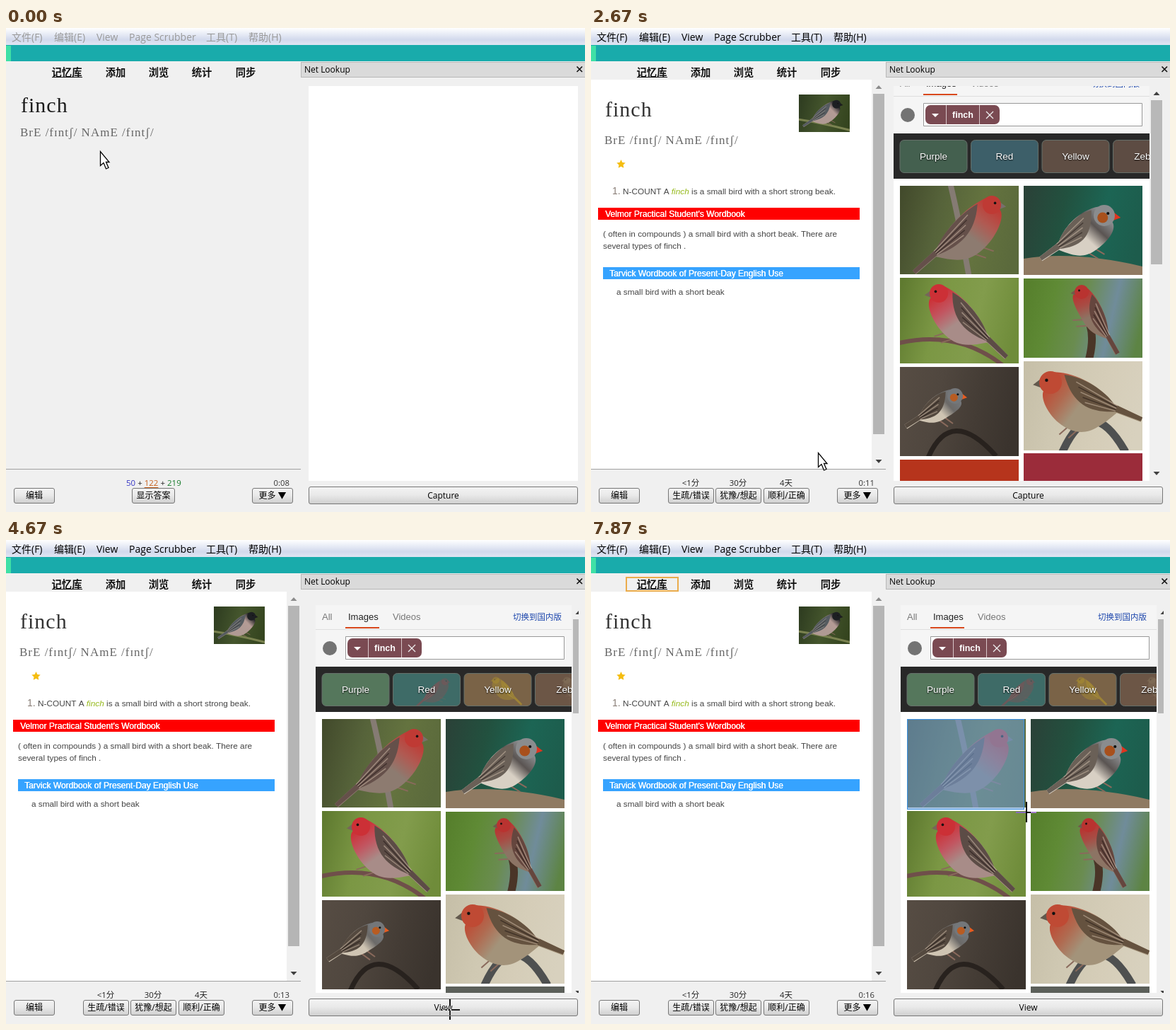
These frames come from a looping animation (819 by 684 pixels, 8 s). An HTML page with a canvas:

```html
<!DOCTYPE html>
<html lang="zh">
<head>
<meta charset="utf-8">
<title>Flashcard image capture</title>
<style>
html, body { margin: 0; width: 100%; height: 100%; overflow: hidden; background: #f0f0f0; }
canvas { display: block; }
</style>
</head>
<body>
<canvas id="stage" width="819" height="684"></canvas>
<script>
const ctx = document.getElementById('stage').getContext('2d');
const LOOP = 8000;
const ANSWER = 1400, PAGE = 2070, SETTLED = 2870, CAPTURE = 4330, DRAG = 6670;

const ui = (size, weight = '') => `${weight} ${size}px "Open Sans", "Noto Sans CJK SC", sans-serif`;
const sans = (size, style = '') => `${style} ${size}px "Liberation Sans", "Noto Sans CJK SC", sans-serif`;
const serif = size => `${size}px "Liberation Serif", serif`;

// Drawing helpers
function rect(x, y, w, h, color) {
  ctx.fillStyle = color;
  ctx.fillRect(x, y, w, h);
}
function text(str, x, y, font, color = '#000', align = 'left') {
  ctx.font = font;
  ctx.fillStyle = color;
  ctx.textAlign = align;
  ctx.fillText(str, x, y);
  return ctx.measureText(str).width;
}
function spaced(str, x, y, font, color) {
  ctx.letterSpacing = '1px';
  text(str, x, y, font, color);
  ctx.letterSpacing = '0px';
}
function line(color, width, ...p) {
  ctx.strokeStyle = color;
  ctx.lineWidth = width;
  ctx.beginPath();
  for (let i = 0; i < p.length; i += 2) ctx.lineTo(p[i], p[i + 1]);
  ctx.stroke();
}
function polygon(fill, ...p) {
  ctx.fillStyle = fill;
  ctx.beginPath();
  for (let i = 0; i < p.length; i += 2) ctx.lineTo(p[i], p[i + 1]);
  ctx.closePath();
  ctx.fill();
}
function circle(x, y, r, fill) {
  ctx.fillStyle = fill;
  ctx.beginPath();
  ctx.arc(x, y, r, 0, 7);
  ctx.fill();
}
function rounded(x, y, w, h, r, fill, stroke) {
  ctx.beginPath();
  ctx.roundRect(x, y, w, h, r);
  ctx.fillStyle = fill;
  ctx.fill();
  if (stroke) {
    ctx.strokeStyle = stroke;
    ctx.lineWidth = 1;
    ctx.stroke();
  }
}
function gradient(x0, y0, x1, y1, ...colors) {
  const g = ctx.createLinearGradient(x0, y0, x1, y1);
  colors.forEach((c, i) => g.addColorStop(i / (colors.length - 1), c));
  return g;
}
function clipped(x, y, w, h, draw) {
  ctx.save();
  ctx.beginPath();
  ctx.rect(x, y, w, h);
  ctx.clip();
  draw();
  ctx.restore();
}
const ramp = (t, from, to) => Math.min(1, Math.max(0, (t - from) / (to - from)));

// Pictures: branch = start, control, end, width, colour; colors = head, wing, breast, belly, beak
const photos = {
  vertical: { bg: ['#434b2c', '#56633a', '#64733f', '#5b6a3c'], branch: [71, -4, 84, 50, 98, 130, 8, '#857b73'],
    head: [130, 27], tail: [20, 122], r: 13, fat: .27, colors: ['#bf3a34', '#65504a', '#b05a52', '#8d7b70', '#77706c'] },
  rock: { bg: ['#2a4238', '#22513f', '#1c6554', '#1d5c4c'], branch: [-5, 118, 70, 104, 175, 130, 28, '#8f7a62'],
    head: [114, 42], tail: [24, 103], r: 15, fat: .31, colors: ['#8a8c8e', '#6a6057', '#5a5452', '#d8d0c4', '#e0341e'], cheek: '#a8501c' },
  perched: { bg: ['#5f7a30', '#7b9744', '#829c4c', '#6f8c3a'], branch: [-5, 93, 80, 72, 146, 124, 6, '#6f4f4a'],
    head: [55, 22], tail: [151, 112], r: 13, fat: .28, colors: ['#cc3036', '#5c4c46', '#c25560', '#a88c88', '#77655a'] },
  stump: { bg: ['#567f2c', '#5f8a35', '#6a8c50', '#708c9a', '#5d8444'], branch: [94, 66, 100, 86, 92, 116, 11, '#4a3527'],
    head: [82, 19], tail: [133, 106], r: 10, fat: .19, colors: ['#b93330', '#65463e', '#a84c44', '#8c7464', '#71594b'] },
  grey: { bg: ['#564c43', '#50473f', '#443c35', '#3a332d'], branch: [40, 128, 72, 54, 136, 126, 7, '#28221e'],
    head: [78, 41], tail: [8, 84], r: 11, fat: .24, colors: ['#74777a', '#54493f', '#6c6a68', '#cfc4b2', '#e85c20'], cheek: '#b85c22' },
  pale: { bg: ['#c6bfa8', '#cfc8b2', '#d5cdb8', '#d8d1be'], branch: [54, 130, 94, 40, 144, 128, 11, '#4e5050'],
    head: [38, 30], tail: [167, 82], r: 16, fat: .37, colors: ['#bf4a34', '#65523f', '#b06a50', '#a3937a', '#62594d'] },
  card: { bg: ['#2e3c20', '#45562d', '#35451f'], branch: [0, 82, 70, 92, 170, 118, 7, '#7a8250'],
    head: [124, 32], tail: [14, 104], r: 14, fat: .28, colors: ['#1d1f22', '#555b60', '#b49b95', '#b09a94', '#1b1c1d'] },
};

function bird({ head: [hx, hy], tail: [tx, ty], r, fat, colors: [head, wing, breast, bellyColor, beak], cheek }) {
  const side = Math.sign(tx - hx), len = Math.hypot(tx - hx, ty - hy), belly = len * fat;
  ctx.save();
  ctx.translate(hx, hy);
  ctx.rotate(Math.atan2(ty - hy, tx - hx));
  ctx.scale(1, side);
  for (const at of [.36, .46]) line('#8a6a5c', 2, len * at, belly * .8, len * (at - .08), belly + 12);

  ctx.beginPath();
  ctx.moveTo(0, -r);
  ctx.bezierCurveTo(len * .22, -r * 1.7, len * .5, -r * 1.3, len * .68, -r * .35);
  ctx.lineTo(len, -3);
  ctx.lineTo(len, 4);
  ctx.lineTo(len * .74, r * .3);
  ctx.bezierCurveTo(len * .62, belly * .7, len * .54, belly, len * .36, belly);
  ctx.bezierCurveTo(len * .16, belly, -len * .04, r * 1.8, -r * .3, r * .9);
  ctx.fillStyle = gradient(0, 0, len * .55, belly * .4, head, breast, bellyColor, bellyColor);
  ctx.fill();

  ctx.beginPath();
  ctx.moveTo(len * .1, -r * 1.1);
  ctx.bezierCurveTo(len * .3, -r * 1.6, len * .55, -r * 1.1, len * .68, -r * .35);
  ctx.lineTo(len, -3);
  ctx.lineTo(len, 3);
  ctx.lineTo(len * .72, r * .25);
  ctx.bezierCurveTo(len * .5, r * 1.1, len * .3, r * 1.2, len * .1, -r * 1.1);
  ctx.fillStyle = wing;
  ctx.fill();
  for (let i = 0; i < 5; i++) {
    const x = len * (.24 + i * .04), y = r * (i * .35 - .9);
    line(i % 2 ? 'rgba(30,20,18,.5)' : 'rgba(215,195,175,.5)', 1.5, x, y, len * .72, r * (i * .12 - .3));
  }
  ctx.restore();
  polygon(beak, hx - side * r * .7, hy - r * .45, hx - side * r * 1.55, hy + r * .2, hx - side * r * .6, hy + r * .55);
  circle(hx, hy, r, head);
  if (cheek) circle(hx + side * r * .15, hy + r * .2, r * .5, cheek);
  circle(hx - side * r * .35, hy - r * .2, r * .14, '#111');
}
function photo(x, y, w, h, name, scale = 1) {
  const spec = photos[name], [x0, y0, cx, cy, x1, y1, width, color] = spec.branch;
  clipped(x, y, w, h, () => {
    ctx.translate(x, y);
    ctx.scale(scale, scale);
    rect(0, 0, 170, 130, gradient(0, 20, 168, 60, ...spec.bg));
    ctx.strokeStyle = color;
    ctx.lineWidth = width;
    ctx.beginPath();
    ctx.moveTo(x0, y0);
    ctx.quadraticCurveTo(cx, cy, x1, y1);
    ctx.stroke();
    bird(spec);
  });
}

// Interface parts
function button(label, x, y, w, h, hover = 0, focus = false) {
  rounded(x + .5, y + .5, w, h, 2.5, gradient(0, y, 0, y + h, '#f4f4f4', '#e9e9e9', '#d0d0d0'), '#777');
  if (hover) {
    ctx.globalAlpha = hover;
    rounded(x + .5, y + .5, w, h, 2.5, gradient(0, y, 0, y + h, '#e6f3fb', '#c4e3f5', '#a2cee6'), '#3c7fb1');
    ctx.globalAlpha = 1;
  }
  if (focus) {
    ctx.strokeStyle = '#dc9a3c';
    ctx.lineWidth = 2;
    ctx.strokeRect(x + 1, y + 1, w - 1, h - 1);
  }
  text(label, x + w / 2 + .5, y + h / 2 + 4.5, ui(12), '#000', 'center');
}
function scrollbar(x, top, bottom, thumbHeight, upColor, thumb) {
  rect(x - 10, top, 20, bottom - top, '#f0f0f0');
  rect(x - 8, top + 20, 16, thumbHeight, thumb);
  polygon(upColor, x - 4.5, top + 13, x + 4.5, top + 13, x, top + 8);
  polygon('#404040', x - 4.5, bottom - 13, x + 4.5, bottom - 13, x, bottom - 8);
}

function drawMenu(t) {
  rect(0, 0, 819, 25, gradient(0, 0, 0, 25, '#fff', '#e8ecf6', '#d2d9ec', '#e2e7f4'));
  const color = t < ANSWER ? '#999' : '#000';
  [['文件(F)', 8], ['编辑(E)', 68], ['View', 128], ['Page Scrubber', 174], ['工具(T)', 283], ['帮助(H)', 343]]
    .forEach(([label, x]) => text(label, x, 18, ui(14), color));
  rect(0, 24, 819, 23, '#19abab');
  rect(0, 25, 7, 22, '#3fe0a6');
}
function drawToolbar(t) {
  [['记忆库', 86], ['添加', 155], ['浏览', 216], ['统计', 277], ['同步', 339]]
    .forEach(([label, x]) => text(label, x, 68, ui(14.3, 'bold'), '#111', 'center'));
  rect(65, 69, 43, 1, '#111');
  if (t >= 4800) {
    ctx.strokeStyle = '#eaac4c';
    ctx.lineWidth = 2;
    ctx.strokeRect(50, 53, 73, 19);
  }
}
function drawQuestion() {
  spaced('finch', 21, 119, serif(30), '#1c1c1c');
  spaced('BrE /fɪntʃ/ NAmE /fɪntʃ/', 20, 153, serif(17), '#666');
}
function heading(str, x, y, left, color) {
  rect(left, y, 380 - left, 17, color);
  for (const dx of [0, .4]) text(str, x + dx, y + 12.5, sans(12), '#fff');
}
function drawAnswer() {
  rect(0, 73, 397, 550, '#fff');
  scrollbar(407, 73, 623, 481, '#8c8c8c', '#b5b5b5');
  spaced('finch', 20, 125, serif(30), '#333');
  spaced('BrE /fɪntʃ/ NAmE /fɪntʃ/', 19, 164, serif(17), '#666');
  photo(294, 94, 72, 53, 'card', 72 / 168);
  const star = [];
  for (let i = 0; i < 10; i++) {
    const a = i * Math.PI / 5 - Math.PI / 2, r = i % 2 ? 3.2 : 6.5;
    star.push(42.5 + r * Math.cos(a), 192.5 + r * Math.sin(a));
  }
  polygon('#f5bd10', ...star);
  const body = sans(11.8), ink = '#444';
  text('1.', 30, 235, sans(14), '#8a7f78');
  let x = 45;
  x += text('N-COUNT A ', x, 235, body, ink);
  x += text('finch', x, 235, sans(11.8, 'italic'), '#94b818');
  text(' is a small bird with a short strong beak.', x, 235, body, ink);
  heading("Velmor Practical Student's Wordbook", 20, 254, 10, '#f00');
  text('( often in compounds ) a small bird with a short beak. There are', 17, 295, body, ink);
  text('several types of finch .', 17, 312, body, ink);
  heading('Tarvick Wordbook of Present-Day English Use', 26, 338, 17, '#36a3ff');
  text('a small bird with a short beak', 36, 377, body, ink);
}
function drawBottom(t) {
  rect(0, 623, 417, 1, '#a0a0a0');
  button('编辑', 11, 650, 57, 21);
  button('更多 ▼', 348, 650, 57, 21);
  const seconds = 8 + Math.floor((t + 600) / 1000);
  text('0:' + String(seconds).padStart(2, '0'), 401, 647, ui(11.3), '#333', 'right');
  if (t < ANSWER) {
    let x = 170;
    [['50', '#3434c4'], [' + ', '#222'], ['122', '#c8601c'], [' + ', '#222'], ['219', '#147a28']].forEach(([s, color]) => {
      const w = text(s, x, 647, ui(11.5), color);
      if (s === '122') rect(x, 649, w, 1, color);
      x += w;
    });
    button('显示答案', 178, 650, 60, 21, 0, t >= 1070);
  } else {
    [['<1分', '生疏/错误', 109], ['30分', '犹豫/想起', 176], ['4天', '顺利/正确', 244]].forEach(([wait, label, x], i) => {
      text(wait, x + 32, 647, ui(11.5), '#222', 'center');
      button(label, x, 650, 64, 21, 0, i === 1 && t < 2600);
    });
  }
}

// Search page in its own coordinates, 362 wide
function drawPage(t) {
  const loaded = t >= SETTLED;
  rect(0, 0, 362, 600, '#fff');
  rect(0, 0, 362, 87, '#f5f5f5');
  text('All', 9, 21, sans(13), '#777');
  text('Images', 46, 21, sans(13), '#222');
  text('Videos', 109, 21, sans(13), '#777');
  text('切换到国内版', 348, 21, sans(11.5), '#1c46ac', 'right');
  rect(0, 34, 362, 1, '#dedede');
  rect(42, 31, 48, 2, '#d8481c');
  circle(20, 61, 10, '#737373');
  rounded(42.5, 44.5, 309, 32, 0, '#fff', '#999');
  rounded(45, 47, 105, 27, 7, '#7a4a52');
  rect(74, 47, 1, 27, '#d8c6c9');
  rect(121, 47, 1, 27, '#d8c6c9');
  polygon('#fff', 54, 59, 64, 59, 59, 64);
  text('finch', 98, 65, sans(12.5, 'bold'), '#fff', 'center');
  line('#eee', 1.3, 131, 56, 141, 66);
  line('#eee', 1.3, 141, 56, 131, 66);

  rect(0, 87, 362, 64, '#282828');
  const chips = [['Purple', '#44604f', '#55775c'], ['Red', '#3d5f69', '#3e6b67'], ['Yellow', '#5f4e44', '#7a6347'], ['Zebra', '#5d4c43', '#6c5646']];
  const tints = [null, '#8c4c50', '#b89a28', '#8a7860'];
  chips.forEach(([label, plain, rich], i) => {
    const x = 9 + i * 100.5;
    rounded(x, 96.5, 95, 46, 6, loaded ? rich : plain, '#66706a');
    if (loaded && tints[i]) clipped(x, 97, 95, 45, () => {
      ctx.globalAlpha = .35;
      ctx.translate(x + 24, 98);
      ctx.scale(.38, .38);
      bird({ ...photos[i === 1 ? 'vertical' : 'perched'], colors: Array(5).fill(tints[i]) });
    });
    ctx.shadowColor = '#000';
    ctx.shadowOffsetY = 1;
    ctx.shadowBlur = 2;
    text(label, x + 47.5, 124, sans(13.5), '#fff', 'center');
    ctx.shadowColor = 'transparent';
    ctx.shadowOffsetY = ctx.shadowBlur = 0;
  });

  photo(9, 161, 168, 125, 'vertical');
  photo(184, 161, 168, 126, 'rock');
  photo(9, 291, 168, 121, 'perched');
  photo(184, 292, 168, 112, 'stump');
  photo(9, 417, 168, 126, 'grey');
  photo(184, 409, 168, 126, 'pale');
  const captured = t >= CAPTURE;
  rect(9, 548, 168, 50, captured ? '#cfc0b4' : '#b6341c');
  rect(184, 539, 168, 50, captured ? '#5c605a' : '#9b2c3a');
}
function drawDock(t) {
  rect(417, 47, 402, 637, '#f0f0f0');
  rect(417, 48, 402, 22, '#b8b8b8');
  rect(418, 49, 401, 20, '#dadada');
  text('Net Lookup', 422, 63, ui(12));
  line('#111', 1.6, 807.5, 54.5, 815, 62);
  line('#111', 1.6, 815, 54.5, 807.5, 62);

  const captured = t >= CAPTURE, shift = captured ? 10 : 0;
  if (t < PAGE) rect(428, 82, 381, 558, '#fff');
  else clipped(428 + shift, 82 + shift, 382 - shift, 558 - shift, () => {
    ctx.translate(428 + shift, 82 + shift);
    ctx.save();
    ctx.translate(0, t < SETTLED ? -20 : 0);
    drawPage(t);
    ctx.restore();
    scrollbar(372, 0, 558, captured ? 133 : 232, '#404040', '#b8b8b8');
  });
  const hover = captured
    ? ramp(t, 4800, 4930) * (1 - ramp(t, 5930, 6130))
    : ramp(t, 4070, 4200);
  button(captured ? 'View' : 'Capture', 428, 648, 380, 24, hover);
}

// Pointer: time, x, y
const track = [[0, 133, 174], [270, 133, 174], [470, 146, 169], [670, 146, 169], [900, 234, 420], [1130, 217, 657],
  [2530, 217, 657], [2670, 320, 600], [3330, 650, 298], [3470, 650, 298], [4270, 627, 663], [5070, 627, 663],
  [5670, 479, 292], [5870, 452, 261], [6130, 450, 257], [DRAG, 450, 257], [7400, 613, 382], [7600, 615, 384], [LOOP, 615, 384]];
function pointerAt(t) {
  const i = track.findIndex(k => k[0] > t);
  const [t0, x0, y0] = track[i - 1], [t1, x1, y1] = track[i];
  const p = ramp(t, t0, t1);
  return [Math.round(x0 + (x1 - x0) * p), Math.round(y0 + (y1 - y0) * p)];
}
function outline(path, fill = '#fff') {
  ctx.fillStyle = fill;
  ctx.fill(path);
  ctx.strokeStyle = '#000';
  ctx.lineWidth = 1.3;
  ctx.stroke(path);
}
const ARROW = new Path2D('M.5 .5V20.5L5 16.5L8.5 25L12 23.5L8.5 15.5H13Z');
const HOURGLASS = new Path2D('M10 3H25V6H23Q23 10 19 13Q23 16 23 20H25V23H10V20H12Q12 16 16 13Q12 10 12 6H10Z');
const SAND = new Path2D('M14 8H21L17.5 12ZM13 20Q17.5 13 22 20Z');
const HAND = new Path2D('M0 1.5Q2 -1.5 4 1.5V9Q7 7.5 8 10Q11 8.5 12 11Q15 10 15 14V18L13 25H3L-3 16Q-4 13 -1.5 13L0 15Z');

function drawPointer(t) {
  const [x, y] = pointerAt(t);
  ctx.save();
  ctx.translate(x, y);
  if (t >= CAPTURE) {
    ctx.globalCompositeOperation = 'difference';
    rect(-14, 0, 29, 2, '#fff');
    rect(0, -14, 2, 14, '#fff');
    rect(0, 2, 2, 13, '#fff');
  } else if (x > 428 && y < 640) {
    outline(HAND);
    for (const i of [0, 1, 2]) line('#000', 1, 4 + i * 4, 9 + i, 4 + i * 4, 14);
  } else {
    outline(ARROW);
    if (t >= ANSWER && t < 2530) {
      outline(HOURGLASS);
      ctx.fillStyle = '#000';
      ctx.fill(SAND);
    }
  }
  ctx.restore();
}
function drawSelection(t) {
  if (t <= DRAG) return;
  const [x, y] = pointerAt(t), w = x - 450, h = y - 257;
  rect(447, 253, w, h, 'rgba(115,160,212,.58)');
  ctx.strokeStyle = '#3a8fe0';
  ctx.lineWidth = 1;
  ctx.strokeRect(447.5, 253.5, w, h);
}

function draw(t) {
  rect(0, 0, 819, 684, '#f0f0f0');
  drawMenu(t);
  drawToolbar(t);
  if (t < ANSWER) drawQuestion(); else drawAnswer();
  drawBottom(t);
  drawDock(t);
  drawSelection(t);
  drawPointer(t);
}

const start = performance.now();
function tick() {
  draw((performance.now() - start) % LOOP);
  requestAnimationFrame(tick);
}
tick();
</script>
</body>
</html>
```
